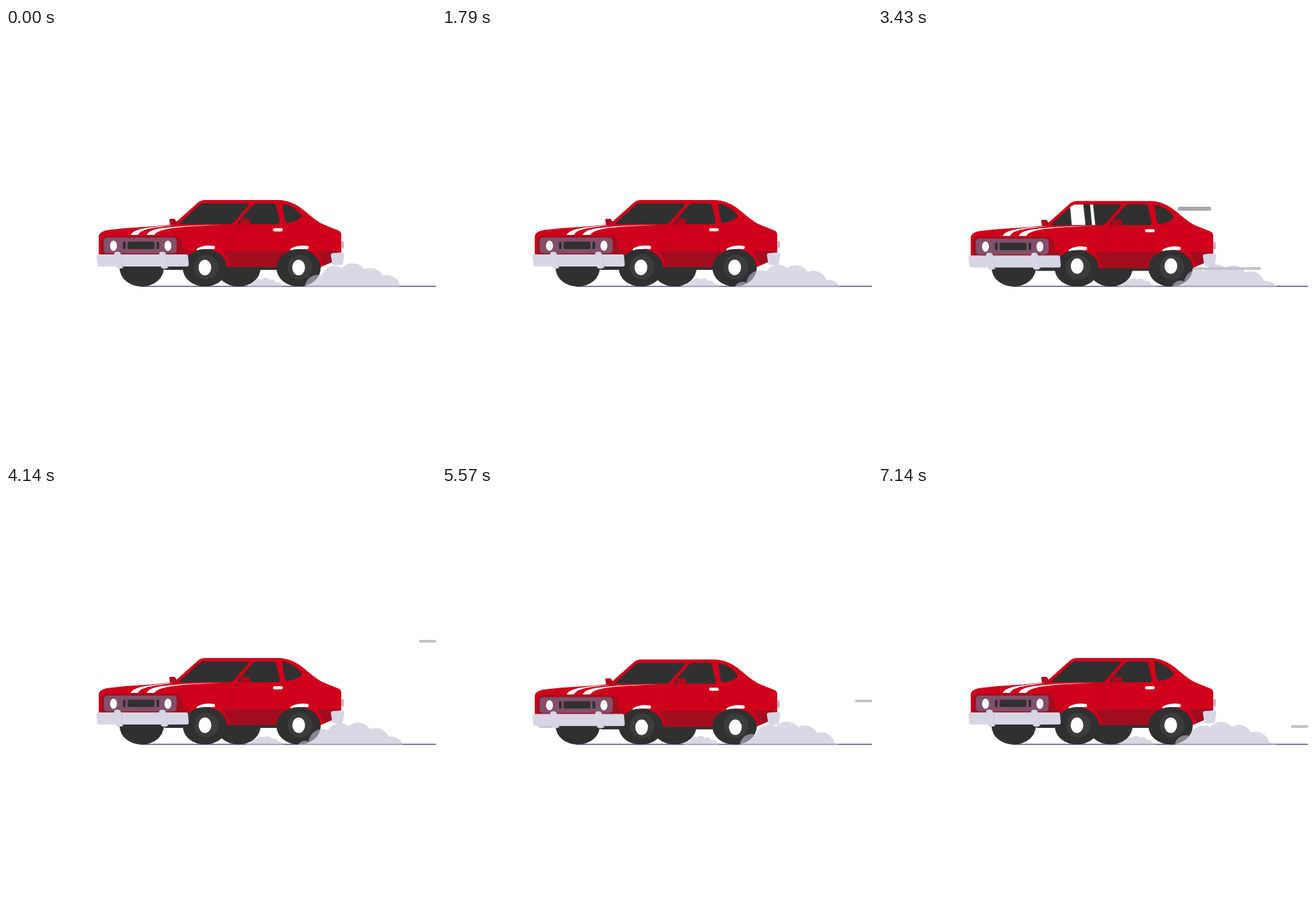
An HTML page that plays this animation: 640x640 px, repeating every 7210 ms.

```html
<!DOCTYPE html>
<html lang="en">
<head>
<meta charset="utf-8">
<title>Driving car</title>
<style>
html, body { margin: 0; width: 100%; height: 100%; overflow: hidden; background: #fff; }
svg { display: block; width: 100vw; height: 100vh; }
.red { fill: #d0021b; }
.shade { fill: #a30d20; }
.dark { fill: #303030; }
.chrome { fill: #d6d6e4; }
.white { fill: #fff; }
.line { fill: none; stroke-linecap: round; }
.streak { stroke: #c4c4c4; stroke-width: 4; }
.dash { stroke: #a9a9a9; stroke-width: 6; }
.seam { stroke: #b30a20; stroke-width: 1; }
.edge { stroke: #c2c2d2; stroke-width: 1; }
.arch { stroke: #d0021b; stroke-width: 6; stroke-linecap: butt; }
.gleam { stroke: #fff; stroke-width: 5.2; }
.smoke { fill: #c1c1d5; opacity: .6; }
</style>
</head>
<body>
<svg viewBox="0 0 640 640">
  <defs>
    <clipPath id="aboveGround"><rect y="300" width="640" height="85"/></clipPath>
    <path id="windscreen" d="M259 292Q257 291 260 289L288 263.500Q291 261 295 261H358Q364 261 360 265L339 289Q336 292 332 292Z"/>
    <clipPath id="glass"><use href="#windscreen"/></clipPath>
    <path id="puff" clip-path="url(#aboveGround)"/>
  </defs>

  <g id="streaks"></g>
  <path d="M200 384.500H640" stroke="#4c4a75" stroke-width="1.600"/>
  <use href="#puff" class="smoke" transform="translate(200.240 238.700) scale(.36 .38)"/>

  <g id="farWheels" class="dark"></g>

  <g id="car">
    <path class="dark" d="M170 340H470L462 358Q461 360 458 360H238Z"/>
    <path class="red" d="M138 339L138 311Q138 302.500 153 300.500C185 296.500 215 296 243 293L254 288L286 259.500Q290 256 296 256H404C438 256 450 283 474 293L495 301.500Q499 303 499 308V335L484 349L468 356H270L200 345Z"/>
    <path class="shade" d="M141 339V317Q141 309 150 309H252Q260 309 261.500 318L264 331H281L270 348H141Z"/>
    <path class="shade" d="M314 332H424L406 355Q405 356 402 356H326Z"/>
    <path class="shade" d="M446 332H499V335L484 349L466 356Z"/>
    <rect x="145.500" y="312" width="108.500" height="23.500" rx="5" fill="#82506b"/>
    <g class="dark">
      <rect x="174" y="318" width="4" height="11" rx="1.500"/>
      <rect x="181" y="318" width="40" height="11" rx="2"/>
      <rect x="224" y="318" width="4" height="11" rx="1.500"/>
    </g>
    <g class="white">
      <ellipse cx="160" cy="324" rx="5.200" ry="7.600"/>
      <ellipse cx="241" cy="324" rx="5.200" ry="7.600"/>
      <path d="M185.500 308C191 297 220 296 255 293C223 297 201 298 196.500 308Z"/>
      <path d="M209.500 308C214 297 240 295 335 292.300C262 295.500 226 297 221 308Z"/>
    </g>
    <use href="#windscreen" class="dark"/>
    <g id="glare" class="white" clip-path="url(#glass)">
      <path d="M285.500 260H305.500L309 293H288.500ZM315.500 260H320L323.500 293H318.500Z"/>
    </g>
    <path class="dark" d="M348 292Q344 291 347 287L367 264Q370 261 374 261H397Q401 261 402 265L407 286Q408 292 403 292Z"/>
    <path class="dark" d="M411.500 265Q411.500 261 416 262.500C428 266 438 274 440 281Q436 287 420 290Q416 291 415 286Z"/>
    <path class="line seam" d="M336.500 293V332M412.500 290V332"/>
    <path fill="#b0081d" d="M243 285.500Q243 284 245 284H251L255 290L253 293.500H246Q244 293.500 244 292ZM349 286Q349 284 351 284H361Q363 284 363 286V291Q363 293 361 293H351L345 298L342 296L349 291Z"/>
    <rect class="white" x="397.500" y="298" width="14.500" height="4.600" rx="2.300"/>
    <path class="line arch" d="M271 338C279 328 290 327 298 327C316 327 327 337 330 355"/>
    <path class="line arch" d="M404 355C412 349 413 327 440 327C456 327 466 337 470 354"/>
    <path class="line gleam" d="M286.500 330Q296 325 308.500 326.700M426 330Q436 325 448 326.700"/>
    <rect x="499.500" y="317" width="3" height="11" rx="1.400" fill="#c5a4b4"/>
  </g>

  <g id="nearWheels"></g>

  <g id="bumpers" class="chrome">
    <path d="M134.500 340Q134.500 337 138 337H268Q271 337 271 340L272 352Q272 355 269 355H140Q136.500 355 136 352Z"/>
    <path class="line edge" d="M171 337L174 357M238 337L241 357"/>
    <path d="M161 336Q161 333 166 333Q170.500 333 171 337L173.500 355Q174 358 171 358H167Q164 358 163.500 355Z"/>
    <path d="M228 336Q228 333 233 333Q237.500 333 238 337L240.500 355Q241 358 238 358H234Q231 358 230.500 355Z"/>
    <path d="M483.500 338Q483.500 335 487 335L500 334Q503.500 334 503.500 337L501.500 350Q501 353 498 353H489Q486 353 485.500 350Z"/>
  </g>

  <use href="#puff" class="smoke"/>
</svg>
<script>
const LOOP = 7210, STEPS = 101, STEP = LOOP / STEPS;
const FRAME = 40, CYCLE = 30;
const byId = id => document.getElementById(id);

function add(parent, tag, attrs) {
  const node = document.createElementNS("http://www.w3.org/2000/svg", tag);
  return set(byId(parent).appendChild(node), attrs);
}
function set(node, attrs) {
  for (const key in attrs) node.setAttribute(key, attrs[key]);
  return node;
}

// Linear interpolation through [position, value] pairs.
function through(points, at) {
  let i = 1;
  while (i < points.length - 1 && points[i][0] < at) i++;
  const [a, va] = points[i - 1], [b, vb] = points[i];
  return va + (vb - va) * (at - a) / (b - a);
}

const streaks = [[231, 1], [320, 7], [358, 16]].map(([y, start]) =>
  ({ y, start, node: add("streaks", "path", { class: "line streak" }) }));
const dashes = [[269, 24, 525, 50], [283, 6, 549, 56], [302, 6, 553, 54]].map(([y, peak, reach, length]) =>
  ({ y, peak, reach, length, node: add("streaks", "path", { class: "line dash" }) }));

for (const cx of [202, 346])
  add("farWheels", "ellipse", { cx, cy: 357, rx: 33, ry: 28 });
const wheels = [296, 435.5].map(cx => ({
  cx,
  tyre: add("nearWheels", "ellipse", { cx, rx: 33, class: "dark" }),
  rim: add("nearWheels", "circle", { cx: cx + 2, r: 18.5, fill: "#3c3c3c" }),
  hub: add("nearWheels", "ellipse", { rx: 9.5, ry: 11.5, class: "white" })
}));

const HUB_Y = [[0, 356.5], [2, 358.4], [7, 360], [10, 354.3], [13, 356], [15, 356.5]];
const HUB_X = [[0, 0], [3, 0.5], [7, 3], [10, 0.4], [15, 0]];
const PUFF_Y = [393, 386, 375, 371, 378, 388.5, 406].map((y, i) => [i, y]);

function puffPath(phase) {
  let ridge = "", lobes = "", lastX = 0;
  for (let i = 0; i < 6; i++) {
    const u = i + phase;
    const x = 437 + 26.3 * u - 2.5 * Math.max(0, u - 4) ** 2;
    const y = through(PUFF_Y, u);
    const r = Math.min(21, 8.6 + 9.8 * u);
    ridge += (i ? "L" : "M") + x + " " + y;
    lobes += `M${x - r} ${y}a${r} ${r} 0 1 1 ${2 * r} 0a${r} ${r} 0 1 1 ${-2 * r} 0Z`;
    lastX = x;
  }
  return ridge + `L${lastX} 410L${437 + 26.3 * phase} 410Z` + lobes;
}

function segment(node, visible, from, to, y, cap) {
  set(node, {
    d: `M${from + cap} ${y}H${to - cap}`,
    visibility: visible ? "visible" : "hidden"
  });
}

function draw(time) {
  const step = Math.floor((time % LOOP + 4) / STEP) % STEPS;
  const f = Math.floor(step * 1000 / 14 / FRAME) % CYCLE;
  const bounce = 3.5 * Math.abs(Math.sin(Math.PI * (f + 1) / 15)) ** 3;

  for (const { y, start, node } of streaks) {
    const x = -13 + 52.3 * (f - start);
    segment(node, f >= start, x, x + 112.5, y, 2);
  }
  for (const { y, peak, reach, length, node } of dashes) {
    const away = Math.abs(f - peak);
    const right = reach - 29 * away;
    segment(node, away < 4, right - length, right, y, 3);
  }

  for (const id of ["car", "bumpers"])
    set(byId(id), { transform: `translate(0 ${bounce})` });
  set(byId("glare").firstElementChild, { transform: `translate(${90 * (f - 25)} 0)` });

  const spin = f % 15;
  for (const { cx, tyre, rim, hub } of wheels) {
    set(tyre, { cy: 357 + bounce / 2, ry: 28 - bounce / 2 });
    set(rim, { cy: 356 + bounce / 3 });
    set(hub, { cx: cx + through(HUB_X, spin), cy: through(HUB_Y, spin) });
  }
  set(byId("puff"), { d: puffPath(f % 10 / 10) });
}

function tick() {
  draw(performance.now());
  requestAnimationFrame(tick);
}
tick();
</script>
</body>
</html>
```
